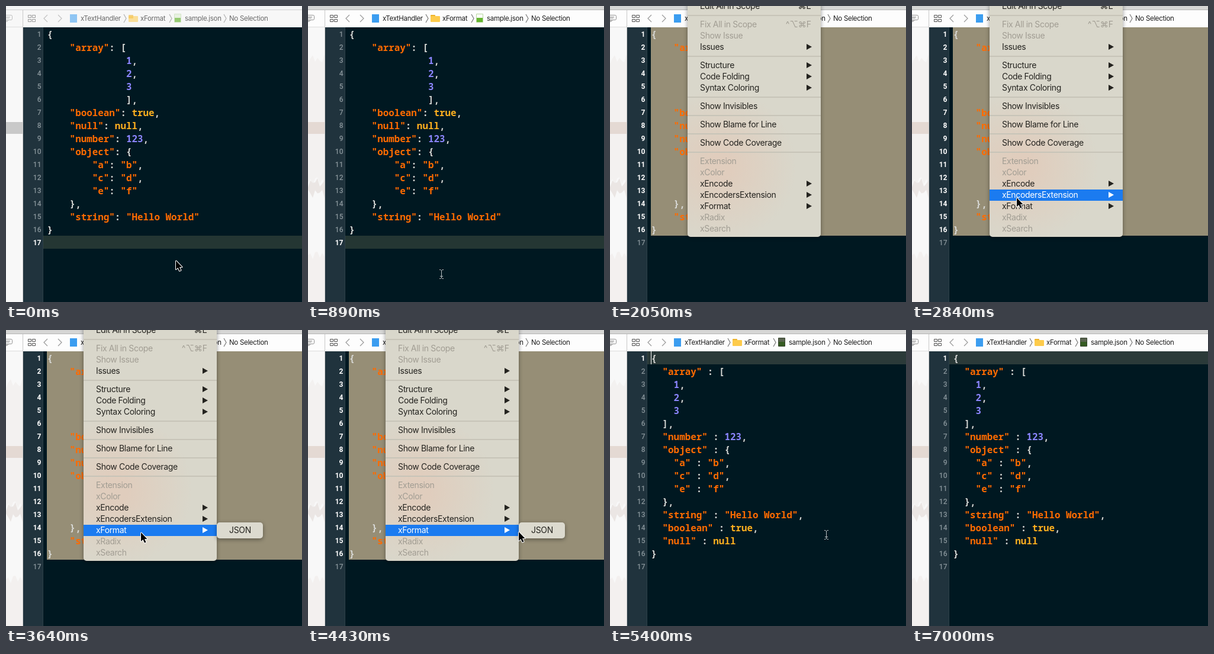
Recreate the animation shown at these times as an HTML page with a canvas. Size 500 by 500 pixels, loop 7.27 s.

```html
<!DOCTYPE html>
<html lang="en">
<head>
<meta charset="utf-8">
<title>Formatting JSON in an editor</title>
<style>
html, body { margin: 0; width: 100%; height: 100%; overflow: hidden; background: #001821; }
canvas { display: block; }
</style>
</head>
<body>
<canvas id="stage" width="500" height="500"></canvas>
<script>
const ctx = document.getElementById('stage').getContext('2d');
const LOOP = 7270, STEP = LOOP / 82;
const ROW = 22, COL = 9.53;
const UI = 'Inter, "DejaVu Sans", sans-serif';
const BLUE = '#1b7bf0';

// moments of the story, in steps
const FOCUS = 1, SELECT = 12, MENU = 23, SUBMENU = 35, CLICK = 56, CLOSED = 60, FORMATTED = 61;

const before = `{
    "array": [
              1,
              2,
              3
              ],
    "boolean": true,
    "null": null,
    "number": 123,
    "object": {
        "a": "b",
        "c": "d",
        "e": "f"
    },
    "string": "Hello World"
}`.split('\n');

const after = `{
  "array" : [
    1,
    2,
    3
  ],
  "number" : 123,
  "object" : {
    "a" : "b",
    "c" : "d",
    "e" : "f"
  },
  "string" : "Hello World",
  "boolean" : true,
  "null" : null
}`.split('\n');

// '!' marks a disabled item, '>' a submenu, '@' a shortcut, '-' a separator
const menuItems = `Edit All in Scope@⌘E
-
!Fix All in Scope@^⌥⌘F
!Show Issue
Issues>
-
Structure>
Code Folding>
Syntax Coloring>
-
Show Invisibles
-
Show Blame for Line
-
Show Code Coverage
-
!Extension
!xColor
xEncode>
xEncodersExtension>
xFormat>
!xRadix
!xSearch`.split('\n');

// pointer moves: first step, last step, destination
const moves = [
  { from: 0, to: 5, x: 225, y: 448 },
  { from: 15, to: 20, x: 148, y: -25 },
  { from: 25, to: 34, x: 179, y: 342 },
  { from: 39, to: 53, x: 365, y: 341 },
  { from: 71, to: 75, x: 449, y: 520 }
];

function pointerAt(n) {
  let x = 287, y = 430;
  for (const m of moves) {
    const k = Math.min(1, Math.max(0, (n - m.from) / (m.to - m.from)));
    const eased = 1 - (1 - k) ** 2;
    x += (m.x - x) * eased;
    y += (m.y - y) * eased;
  }
  return { x, y };
}

function box(x, y, w, h, color, r = 0) {
  ctx.fillStyle = color;
  ctx.beginPath();
  ctx.roundRect(x, y, w, h, r);
  ctx.fill();
}

function frame(x, y, w, h, color, r = 0) {
  ctx.strokeStyle = color;
  ctx.lineWidth = 1;
  ctx.beginPath();
  ctx.roundRect(x + 0.5, y + 0.5, w - 1, h - 1, r);
  ctx.stroke();
}

function shape(points, color) {
  ctx.fillStyle = color;
  ctx.beginPath();
  points.forEach(p => ctx.lineTo(...p));
  ctx.closePath();
  ctx.fill();
}

function line(points, color, width = 1) {
  ctx.strokeStyle = color;
  ctx.lineWidth = width;
  ctx.beginPath();
  points.forEach(p => ctx.lineTo(...p));
  ctx.stroke();
}

function chevron(x, w, h, color) {
  line([[x, 21 - h], [x + w, 21], [x, 21 + h]], color, 1.2);
}

function text(s, x, y, font, color, spacing = 0, align = 'left') {
  ctx.font = font;
  ctx.letterSpacing = spacing + 'px';
  ctx.textAlign = align;
  ctx.fillStyle = color;
  ctx.fillText(s, x, y);
}

// soft band with ragged edges, like a landscape behind frosted glass
function ridge(top, height, color, seed) {
  const rough = i => 6 * Math.sin(i * 2.3 + seed) + 3 * Math.sin(i * 5.1 + seed);
  const points = [];
  for (let i = 0; i <= 7; i++) points.push([i * 4, top + rough(i)]);
  for (let i = 7; i >= 0; i--) points.push([i * 4, top + height + rough(i + 9)]);
  shape(points, color);
}

function sidebar(active) {
  box(0, 0, 28, 500, '#f8f8f8');
  if (active) {
    ridge(90, 205, '#f3f1f0', 1);
    ridge(298, 18, '#ebe6e4', 2);
    ridge(420, 90, '#f3f0ef', 3);
  }
  box(0, 196, 28, 20, active ? '#e4d9d3' : '#c9c9c9');
}

function header(active, edited) {
  box(0, 7, 500, 29, active ? '#fdfdfd' : '#f7f7f7');
  box(0, 0, 500, 6, active ? '#d6d6d5' : '#f4f4f4');
  box(0, 6, 500, 1, active ? '#b4b4b4' : '#d0d0d0');
  box(0, 35, 28, 1, '#dcdcdc');
  box(28, 7, 1, 493, '#c8c8c8');

  ctx.globalAlpha = active ? 1 : 0.55;
  frame(-5, 15, 16, 9, '#929292', 2);
  box(0, 18, 7, 1, '#929292');
  box(0, 20, 6, 1, '#929292');
  line([[1, 24], [1, 27], [4, 24]], '#929292');

  for (const x of [37, 44]) for (const y of [15, 22]) frame(x, y, 6, 5, '#555');
  chevron(70, -6, 6, '#999');
  chevron(88, 6, 6, '#999');
  for (const x of [199, 276, 368]) chevron(x, 4, 7, '#777');

  box(108, 14, 12, 14, '#3b9df0');
  box(207, 15, 8, 6, '#edb32c', 1);
  box(207, 17, 16, 10, '#fdcb4b', 1);
  box(284, 13, 12, 15, edited ? '#37452f' : '#b7d7a0', 1);
  box(285, 14, 10, 6, edited ? '#59634f' : '#fafcf7');
  box(285, 20, 10, 7, edited ? '#355b22' : '#65b52f');
  ctx.globalAlpha = 1;

  const ink = active ? '#1c1c1c' : '#6a6a6a';
  const label = (s, x) => text(s, x, 25, `11.5px ${UI}`, ink, -0.3);
  label('xTextHandler', 126);
  label('xFormat', 227);
  label('sample.json', 302);
  label('No Selection', 377);
}

function tint(token) {
  if (token[0] === '"') return '#ff6b00';
  if (/\d/.test(token)) return '#8b85ff';
  return /[a-z]/.test(token) ? '#ffb01f' : '#d7d8d5';
}

function code(lines) {
  lines.forEach((row, i) => {
    for (const m of row.matchAll(/"[^"]*"|\d+|[a-z]+|[^\s\w"]+/g))
      text(m[0], 69.5 + m.index * COL, 54 + i * ROW, '650 15.88px "Noto Sans Mono", monospace', tint(m[0]));
  });
}

function editor(n) {
  const done = n >= FORMATTED, selected = n >= SELECT && !done;
  const current = done ? 1 : 17;
  const top = 36 + (current - 1) * ROW;
  box(29, 36, 471, 464, '#001821');
  box(29, 36, 33, 464, '#20333d');
  box(62, 36, 1, 464, '#2d4049');
  if (selected) box(69, 36, 431, 16 * ROW, '#968e76');
  else box(63, top, 437, ROW, done ? '#2b3a39' : '#243633');

  for (let i = 1; i <= 17; i++) {
    const lit = selected ? i < 17 : i === current;
    text(i, 59.5, 29.5 + i * ROW, `${lit ? 700 : 500} 12px Roboto, sans-serif`, lit ? '#fff' : '#87949a', 0, 'right');
  }
  code(done ? after : before);

  // the caret blinks: six steps on, six off
  const caret = done ? Math.floor((n - FORMATTED) / 6) % 2 === 0 : n >= FOCUS && n < 10;
  if (caret) box(69, top, 1, ROW, '#fff');
}

function panel(x, y, w, h, fill) {
  ctx.save();
  if (ctx.globalAlpha === 1) {
    ctx.shadowColor = '#0006';
    ctx.shadowBlur = 7;
    ctx.shadowOffsetY = 2;
  }
  box(x, y, w, h, fill, 5);
  ctx.restore();
}

function menu(n, pointer) {
  const font = `14px ${UI}`, ink = '#24231f';
  const glow = ctx.createRadialGradient(185, 270, 20, 185, 270, 130);
  glow.addColorStop(0, '#e0cdbd');
  glow.addColorStop(1, '#d9d7cb');
  ctx.globalAlpha = n < CLICK + 2 ? 1 : 0.4 ** (n - CLICK - 1);
  panel(131, -10, 225, 400, glow);

  let y = 0;
  for (const item of menuItems) {
    if (item === '-') {
      box(131, y - 4, 225, 2, '#c7c4b8');
      y += 12;
      continue;
    }
    const [, off, label, sub, keys] = item.match(/^(!?)([^>@]+)(>?)@?(.*)$/);
    const lit = !off && n > 25 && Math.abs(pointer.y - y) <= 9.5;
    const color = lit ? '#fff' : off ? '#a19d93' : ink;
    if (lit) box(131, y - 9, 225, 19, BLUE);
    text(label, 152, y + 5, font, color, -0.35);
    text(keys, 340, y + 5, font, color, 0, 'right');
    if (sub) shape([[332, y - 5], [341, y], [332, y + 5]], color);
    y += 19;
  }

  if (n >= SUBMENU) {
    const lit = pointer.x > 357 && n !== CLICK;
    panel(356, 325, 78, 27, '#dcdacf');
    if (lit) box(356, 329, 78, 19, BLUE);
    text('JSON', 377, 343, font, lit ? '#fff' : ink, -0.35);
  }
  ctx.globalAlpha = 1;
}

function beam() {
  const color = '#b9c0c2';
  ctx.translate(0, 5);
  box(0, -6, 1, 12, color);
  box(-2, 3, 5, 1, color);
  for (const s of [-1, 1])
    line([[-3, s * 7.5], [-1, s * 7.5], [0.5, s * 6], [2, s * 7.5], [4, s * 7.5]], color);
}

function arrow() {
  const outline = [[0, 0], [0, 15], [3.5, 12], [6, 17.5], [8.5, 16.5], [6, 11], [10.5, 11], [0, 0]];
  ctx.lineJoin = 'round';
  line(outline, '#fff', 2);
  shape(outline, '#000');
}

function drawPointer(n, { x, y }) {
  const overText = n >= FOCUS && n < MENU && y > 36 || n >= FORMATTED;
  ctx.save();
  ctx.translate(Math.round(x), Math.round(y));
  overText ? beam() : arrow();
  ctx.restore();
}

function draw(time) {
  const n = Math.min(81, Math.floor((time % LOOP + 15) / STEP));
  const pointer = pointerAt(n);
  sidebar(n >= FOCUS);
  header(n >= FOCUS, n >= FORMATTED);
  editor(n);
  if (n >= MENU && n < CLOSED) menu(n, pointer);
  drawPointer(n, pointer);
}

let start;
function tick(now) {
  start ??= now;
  draw(now - start);
  requestAnimationFrame(tick);
}
requestAnimationFrame(tick);
</script>
</body>
</html>
```
